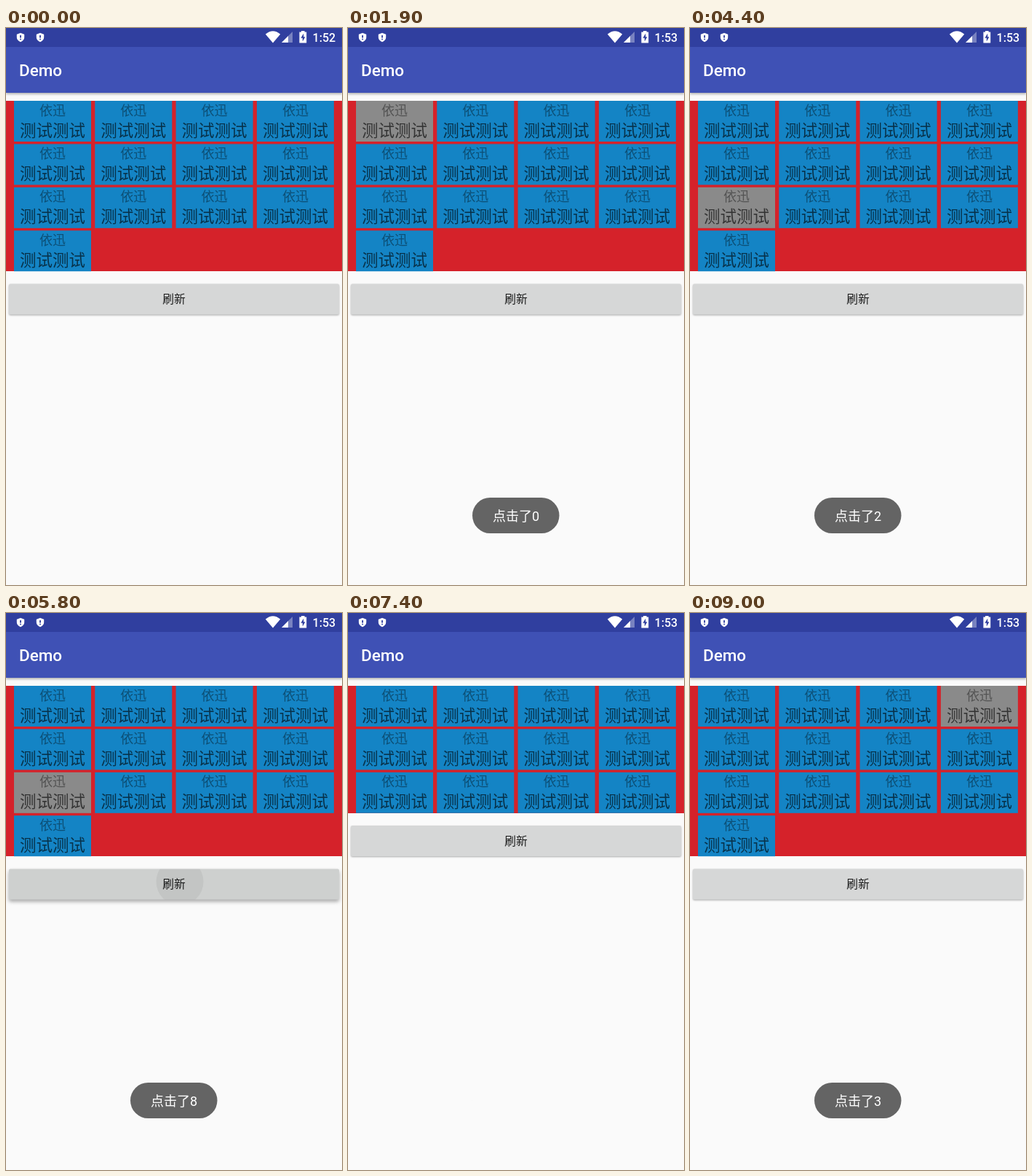
Animation of 462x765 px, one loop 9.6 s. Source, as an HTML page:

```html
<!DOCTYPE html>
<html lang="zh">
<head>
<meta charset="utf-8">
<style>
html, body { margin: 0; width: 100%; height: 100%; overflow: hidden; background: #fafafa; }
svg { display: block; width: 100%; height: 100%; }
text { font-family: Roboto, "Noto Sans CJK SC", "Noto Sans CJK", sans-serif; }
.mid { text-anchor: middle; }
#bar { filter: drop-shadow(0 2px 1.5px rgba(0,0,0,.28)); }
#dialog { transform-origin: 231px 396px; }
</style>
</head>
<body>
<svg viewBox="0 0 462 765">
  <defs>
    <clipPath id="face"><rect x="4" y="351.5" width="454" height="42" rx="2"/></clipPath>
    <g id="shield">
      <path d="M0-6.2L5.2-4.2V0Q5 4 0 6.2Q-5 4-5.2 0V-4.2Z" fill="#fff"/>
      <path d="M0-3V.6M0 1.8V3.2" stroke="#303f9f" stroke-width="1.8"/>
    </g>
  </defs>
  <rect width="462" height="765" fill="#fafafa"/>
  <rect id="bar" y="26" width="462" height="63" fill="#3f51b5"/>
  <rect width="462" height="26" fill="#303f9f"/>
  <use href="#shield" x="20" y="13"/>
  <use href="#shield" x="47" y="13"/>
  <g fill="#fff">
    <path d="M356.8 8.6Q367-.2 377.2 8.6L367 20.4Z"/>
    <path d="M394 5V20H379Z" opacity=".35"/>
    <path d="M388 11V20H379Z"/>
    <path d="M406 4h4.6v1.6h2.6V20.4h-9.8V5.600h2.600Z"/>
    <text id="clock" x="421.6" y="18.800" font-size="16" font-weight="500"></text>
    <text x="18" y="66" font-size="22.5" font-weight="500">Demo</text>
  </g>
  <path d="M409.200 7.500L405.400 13.800H407.800V18.400L411.400 12.200H409.200Z" fill="#303f9f"/>

  <rect id="panel" y="100" width="462" fill="#d5222a"/>
  <g id="grid"></g>

  <g id="button">
    <rect id="base" x="4" y="351.500" width="454" height="42" rx="2"/>
    <circle id="ripple" fill="#000" clip-path="url(#face)"/>
    <text class="mid" x="231" y="378" font-size="15.750" font-weight="500" fill="#000" fill-opacity=".87">刷新</text>
  </g>

  <g id="dialog">
    <rect x="174.500" y="341.500" width="112.500" height="108.500" rx="6" fill="#000" fill-opacity=".4"/>
    <path id="dot" d="M231 394.500l3 3-3 3-3-3Z" fill="#444"/>
    <text x="198.500" y="427.500" font-size="17" fill="#000" fill-opacity=".56">加载中..</text>
  </g>

  <g id="toast" fill="#fff">
    <rect x="171" y="645" width="119.500" height="49" rx="24.500" fill="#646464"/>
    <text x="199" y="676.500" font-size="18">点击了</text>
    <text id="oldDigit" x="253" y="676.500" font-size="18"></text>
    <text id="newDigit" x="253" y="676.500" font-size="18"></text>
  </g>
</svg>
<script>
const $ = id => document.getElementById(id);
const clamp = v => Math.min(1, Math.max(0, v));
const ramp = (t, a, b) => clamp((t - a) / (b - a));
const set = (id, attrs) => {
  for (const k in attrs) $(id).setAttribute(k, attrs[k]);
};

const LOOP = 9600, CELLS = 13, ROW = 59.4;
for (let i = 0; i < CELLS; i++) {
  const x = 11 + i % 4 * 111.3, y = 100 + Math.floor(i / 4) * ROW;
  $('grid').insertAdjacentHTML('beforeend', `<g transform="translate(${x} ${y})">
    <rect width="106" height="56"/>
    <text class="mid" x="53" y="19.500" font-size="18" fill-opacity=".4">依迅</text>
    <text class="mid" x="53" y="48.500" font-size="22.500" fill-opacity=".62">测试测试</text></g>`);
}
const cells = [...$('grid').children];

// Tapped cell over time: [start, index]
const taps = [[0, -1], [1400, 0], [2500, 2], [4400, 8], [7300, -1], [8500, 3]];

function drawGrid(t) {
  const short = t >= 7300 && t < 8500;
  const picked = taps.filter(([start]) => t >= start).pop()[1];
  cells.forEach((cell, i) => {
    cell.firstElementChild.setAttribute('fill', i === picked ? '#8a8a8a' : '#1484c5');
    cell.style.display = short && i > 11 ? 'none' : '';
  });
  set('panel', { height: short ? 175 : 234 });
  set('button', { transform: `translate(0 ${short ? -ROW : 0})` });
}

function drawButton(t) {
  const press = t < 5800 ? 0 : 1 - ramp(t, 6000, 6400);
  const grow = ramp(t, 5800, 6300);
  set('base', { fill: press > .5 ? '#ced0cf' : '#d6d7d7' });
  $('base').style.filter =
    `drop-shadow(0 ${1 + 2 * press}px ${1 + 1.5 * press}px rgba(0,0,0,.32))`;
  set('ripple', {
    cx: 239 - 8 * grow, cy: 369 + 3.5 * grow, r: 32.5 + 200 * grow, opacity: .055 * press
  });
}

function drawDialog(t) {
  const enter = 1 - (1 - ramp(t, 6000, 6300)) ** 2;
  const shown = enter * (1 - ramp(t, 7100, 7400));
  $('dialog').style.opacity = shown;
  $('dialog').style.transform = `scale(${.9 + .1 * shown})`;
  set('dot', { transform: `rotate(${30 + (t - 7100) * .3} 231 380)` });
}

function drawToast(t) {
  const late = t >= 8500;
  $('toast').style.opacity = late
    ? ramp(t, 8500, 9000)
    : ramp(t, 1400, 1900) * (1 - ramp(t, 6800, 7400) ** 3);
  const [from, to, mix] = late ? [3, 3, 1]
    : t < 5200 ? [0, 2, ramp(t, 3200, 3600)]
    : [2, 8, ramp(t, 5100, 5400)];
  $('oldDigit').textContent = from;
  $('newDigit').textContent = to;
  set('oldDigit', { opacity: 1 - mix });
  set('newDigit', { opacity: mix });
}

const began = performance.now();
function draw() {
  // The picture advances in steps of 100 ms
  const t = Math.floor((performance.now() - began) % LOOP / 100) * 100;
  $('clock').textContent = t < 400 ? '1:52' : '1:53';
  drawGrid(t);
  drawButton(t);
  drawDialog(t);
  drawToast(t);
  requestAnimationFrame(draw);
}
draw();
</script>
</body>
</html>
```
